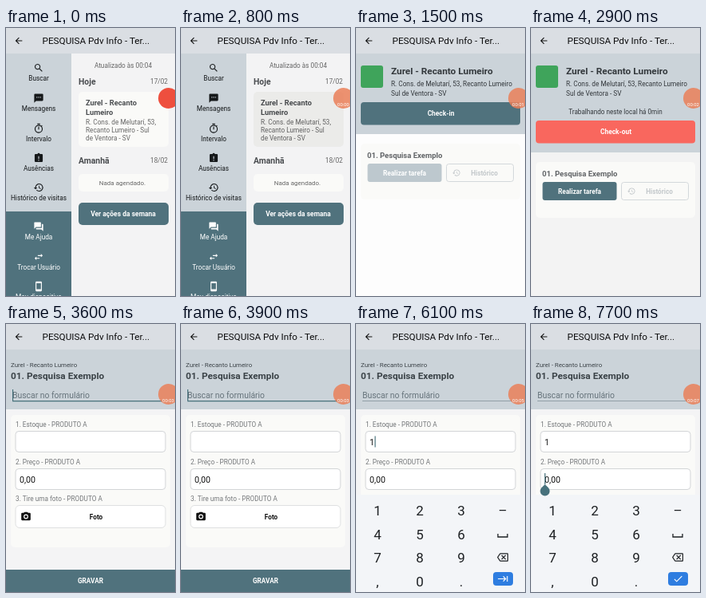
An HTML page for the animation above (8000 ms loop, 212x336 px).

```html
<!DOCTYPE html>
<html lang="pt-BR">
<head>
<meta charset="utf-8">
<title>Pesquisa</title>
<style>
html, body { margin: 0; width: 100%; height: 100%; overflow: hidden; background: #f4f4f5; }
svg { display: block; width: 100%; height: 100%; font-family: Roboto, "Open Sans", sans-serif; }
text { white-space: pre; }
</style>
</head>
<body>
<svg id="stage" viewBox="0 0 212 336"></svg>
<script>
const LOOP = 8000;
const TEAL = '#50727d', BAND = '#cbd3d9', HEAD = '#dadee3', PAGE = '#f4f4f5', CARD = '#fafaf8';
const INK = '#26292c', OFF = '#c3c8cb';
const PLACE = 'Zurel - Recanto Lumeiro';
const STREET = 'R. Cons. de Melutarí, 53,';

// Moments of the session, in ms
const OPEN_VISIT = 940, CHECK_IN = 1900, OPEN_FORM = 3240, SEARCH = 3500;
const STOCK = 4800, KEYS = 4950, TYPED = 5900, PRICE = 7500;

const ICONS = {
  back: 'M20 11H7.8l5.6-5.6L12 4l-8 8 8 8 1.4-1.4L7.8 13H20z',
  search: 'M9.5 3a6.5 6.5 0 1 0 4 11.6l.5.9 5 5 1.5-1.5-5-5-.9-.5A6.5 6.5 0 0 0 9.5 3zM9.5 5a4.5 4.5 0 1 1 0 9 4.5 4.5 0 0 1 0-9z',
  sms: 'M20 2H4a2 2 0 0 0-2 2v18l4-4h14a2 2 0 0 0 2-2V4a2 2 0 0 0-2-2zM9 11H7V9h2zM13 11h-2V9h2zM17 11h-2V9h2z',
  timer: 'M9 1h6v2H9zM11 8h2v6h-2zM19 7.4l1.4-1.4-1.4-1.4L17.6 6A9 9 0 1 0 19 7.4zM12 6a7 7 0 1 1 0 14 7 7 0 0 1 0-14z',
  late: 'M19 3h-4.2a3 3 0 0 0-5.6 0H5a2 2 0 0 0-2 2v14a2 2 0 0 0 2 2h14a2 2 0 0 0 2-2V5a2 2 0 0 0-2-2zM13 18h-2v-2h2zM13 14h-2V8h2z',
  history: 'M13 3a9 9 0 0 0-9 9H1l4 4 4-4H6a7 7 0 1 1 2 5l-1.4 1.4A9 9 0 1 0 13 3zM12 8v5l4.3 2.5.7-1.2-3.5-2.1V8z',
  forum: 'M21 6h-2v9H6v2a1 1 0 0 0 1 1h11l4 4V7a1 1 0 0 0-1-1zM17 12V3a1 1 0 0 0-1-1H3a1 1 0 0 0-1 1v14l4-4h10a1 1 0 0 0 1-1z',
  swap: 'M7 11l-4 4 4 4v-3h7v-2H7zM21 9l-4-4v3h-7v2h7v3z',
  phone: 'M17 1H7a2 2 0 0 0-2 2v18a2 2 0 0 0 2 2h10a2 2 0 0 0 2-2V3a2 2 0 0 0-2-2zM17 18H7V5h10z',
  camera: 'M9 2L7.2 4H4a2 2 0 0 0-2 2v12a2 2 0 0 0 2 2h16a2 2 0 0 0 2-2V6a2 2 0 0 0-2-2h-3.2L15 2zM12 7a5 5 0 1 0 0 10 5 5 0 0 0 0-10zM12 9a3 3 0 1 1 0 6 3 3 0 0 1 0-6z',
  erase: 'M22 3H7L5.4 3.9 0 12l5.4 8.1L7 21h15a2 2 0 0 0 2-2V5a2 2 0 0 0-2-2zM22 19H7l-4.6-7L7 5h15zM10.4 17l3.6-3.6 3.6 3.6 1.4-1.4-3.6-3.6L19 8.4 17.6 7 14 10.6 10.4 7 9 8.4l3.6 3.6L9 15.6z',
  check: 'M9 16.2L4.8 12l-1.4 1.4L9 19 21 7l-1.4-1.4z',
  tab: 'M11.6 7.4L15.2 11H1v2h14.2l-3.6 3.6L13 18l6-6-6-6zM20 6v12h2V6z'
};

const rect = (x, y, w, h, fill, r = 0, more = '') =>
  `<rect x="${x}" y="${y}" width="${w}" height="${h}" rx="${r}" fill="${fill}" ${more}/>`;
// y is the vertical middle of the capitals
const text = (s, x, y, size = 8.24, fill = INK, weight = 400, anchor = 'start') =>
  `<text x="${x}" y="${y + size * .355}" font-size="${size}" fill="${fill}" font-weight="${weight}" text-anchor="${anchor}">${s}</text>`;
const bold = (s, x, y, size, fill) => text(s, x, y, size, fill, 700);
const label = (s, x, y, fill, size = 8.24) => text(s, x, y, size, fill, 700, 'middle');
const icon = (name, x, y, size, fill = '#111') =>
  `<path d="${ICONS[name]}" fill="${fill}" fill-rule="evenodd" transform="translate(${x - size / 2} ${y - size / 2}) scale(${size / 24})"/>`;
const group = (s, y, alpha = 1) => `<g transform="translate(0 ${y})" opacity="${alpha}">${s}</g>`;
const during = (t, from, to, s) => t >= from && t < to ? s : '';
const caret = (t, since, x, y) =>
  (t - since) % 1000 < 500 ? rect(x, y, 1.1, 14, '#3f6a75') : '';
const clamp = v => Math.max(0, Math.min(1, v));

const header = () => rect(0, 0, 212, 32, HEAD) + icon('back', 16, 16, 13) +
  text('PESQUISA Pdv Info - Ter...', 45.5, 16, 11.75, '#0c0c0d');

function home(t) {
  const menu = [
    ['search', 'Buscar', 50], ['sms', 'Mensagens', 88], ['timer', 'Intervalo', 126],
    ['late', 'Ausências', 163], ['history', 'Histórico de visitas', 200],
    ['forum', 'Me Ajuda', 249], ['swap', 'Trocar Usuário', 287], ['phone', 'Meu dispositivo', 324]
  ];
  return rect(0, 0, 212, 336, '#f3f3f4') + header() +
    rect(0, 32, 82, 198, BAND) + rect(0, 230, 82, 106, TEAL) +
    menu.map(([name, s, y]) => {
      const fill = y > 230 ? '#fff' : '#15181a';
      return icon(name, 41, y, 13.5, fill) + text(s, 41, y + 13.5, 8.24, fill, 400, 'middle');
    }).join('') +
    text('Atualizado às 00:04', 147, 47, 8.24, '#666', 400, 'middle') +
    bold('Hoje', 91, 67, 10.4, '#4a4d50') + text('17/02', 203, 67, 8.24, '#666', 400, 'end') +
    rect(91, 80, 113, 69, CARD, 5) +
    bold('Zurel - Recanto', 100, 94, 9.3, '#4a4d50') + bold('Lumeiro', 100, 106, 9.3, '#4a4d50') +
    text(STREET, 100, 118, 8.24, '#666') +
    text('Recanto Lumeiro - Sul', 100, 128, 8.24, '#666') +
    text('de Ventora - SV', 100, 138, 8.24, '#666') +
    during(t, 700, 950, rect(91, 80, 113, 69, '#000', 5, 'opacity=".06"')) +
    bold('Amanhã', 91, 166, 10.4, '#4a4d50') + text('18/02', 203, 166, 8.24, '#666', 400, 'end') +
    rect(91, 183, 113, 22, CARD, 5) + text('Nada agendado.', 146, 194, 8, '#666', 400, 'middle') +
    rect(91, 219, 113, 28, TEAL, 5) + label('Ver ações da semana', 147, 233, '#fff', 8.5);
}

function visit(t) {
  const working = t >= CHECK_IN;
  const drop = working ? 23 : 0;
  const task =
    rect(6, 145, 200, 70, CARD, 5) +
    bold('01. Pesquisa Exemplo', 14, 160, 9.5, '#606366') +
    rect(14.5, 170, 93, 23, working ? TEAL : '#bdc8ce', 3) + label('Realizar tarefa', 61, 182, '#fff') +
    during(t, 3000, 3300, rect(14.5, 170, 93, 23, '#fff', 3, 'opacity=".2"')) +
    rect(113.5, 170.5, 84, 22, CARD, 3, 'stroke="#d3d8db"') +
    icon('history', 126, 181.5, 11, OFF) + label('Histórico', 161, 182, OFF);
  return rect(0, 0, 212, 336, working ? '#f3f3f3' : '#fdfdfd') + header() +
    rect(0, 32, 212, 101 + drop, BAND) +
    rect(6, 47, 28, 28, '#3fa45b', 3) +
    bold(PLACE, 44, 54, 11.8, '#33383c') +
    text(STREET + ' Recanto Lumeiro', 44, 70, 8.24, '#33383c') +
    text('Sul de Ventora - SV', 44, 82, 8.24, '#33383c') +
    (working ? text('Trabalhando neste local há 0min', 106, 105, 8.15, '#33383c', 400, 'middle') : '') +
    rect(6, 93 + drop, 200, 28.5, working ? '#f9675e' : TEAL, 4) +
    label(working ? 'Check-out' : 'Check-in', 106.5, 107 + drop, '#fff', 8.4) +
    during(t, 1600, CHECK_IN, rect(6, 93, 200, 28.5, '#fff', 4, 'opacity=".15"')) +
    group(task, drop);
}

function form(t) {
  const searching = t < STOCK;
  const field = y => rect(12, y, 188, 26, '#fff', 4, 'stroke="#d3d5d7"');
  const stockCaret = t < TYPED ? caret(t, STOCK, 17, 140.5) : caret(t, TYPED, 23.5, 140.5);
  return rect(0, 0, 212, 336, PAGE) + header() + rect(0, 32, 212, 75, BAND) +
    text(PLACE, 6, 51, 7.9, '#3c4348') +
    bold('01. Pesquisa Exemplo', 6, 65, 11.8, '#3a4247') +
    text('Buscar no formulário', 8, 89.5, 10.4, '#66737b') +
    rect(8, 96, 190, searching ? 1.3 : .8, searching ? '#4b737d' : '#84939b') +
    during(t, SEARCH, STOCK, caret(t, SEARCH, 8, 82)) +
    rect(6, 114, 200, 166, CARD, 5) +
    text('1. Estoque - PRODUTO A', 12, 126, 8.24, '#74777a') + field(134.5) +
    (t >= TYPED ? text('1', 17, 148, 10.6, '#111') : '') +
    during(t, STOCK, PRICE, stockCaret) +
    text('2. Preço - PRODUTO A', 12, 173, 8.24, '#74777a') + field(181.5) +
    text('0,00', 17, 195, 10.6, '#111') +
    during(t, PRICE, LOOP, caret(t, PRICE, 17, 187)) +
    text('3. Tire uma foto - PRODUTO A', 12, 219, 8.24, '#74777a') +
    rect(12, 227.5, 188, 28, '#fff', 5, 'stroke="#dfe0e1"') +
    icon('camera', 25, 241.5, 14) + label('Foto', 113, 242, '#111') +
    rect(0, 308, 212, 28, TEAL) + label('GRAVAR', 106, 322, '#fff');
}

function keyboard(t) {
  const cols = [27, 80, 132, 184], rows = [234, 264, 293, 323];
  const keys = ['123–', '456', '789', ',0.'];
  const digits = keys.map((row, r) => [...row].map((k, c) =>
    text(k, cols[c], rows[r], 17, '#1d2023', 400, 'middle')).join('')).join('');
  return rect(0, 214, 212, 122, '#f3f5f8') +
    during(t, 5800, 6000, rect(4, 220, 46, 28, '#dde1e6', 4)) + digits +
    '<path d="M178 263v4h12v-4" fill="none" stroke="#1d2023" stroke-width="1.3"/>' +
    icon('erase', 184, 292.5, 14, '#1d2023') +
    rect(172, 311, 25, 17, '#2e7de0', 4) +
    icon(t >= PRICE ? 'check' : 'tab', 184.5, 319.5, 14, '#fff');
}

// A new screen fades in while settling upwards beneath a blue status strip
function enter(t, start, screen) {
  if (t < start) return '';
  const rise = 27 * (1 - clamp((t - start) / 350)) ** 5;
  const alpha = 1 - (1 - clamp((t - start) / 200)) ** 5;
  const strip = rise > .2 ? rect(0, -30, 212, 30, '#3f51b5') : '';
  return group(strip + screen(t), rise, alpha);
}

function recorder(t) {
  const active = t >= 500, secs = Math.floor((t - 500) / 1000);
  return `<circle cx="204" cy="88" r="13" fill="${active ? '#ea7f58' : '#ee4f3e'}" opacity="${active ? .85 : 1}"/>` +
    (active ? text('00:0' + secs, 203.5, 96, 6, '#fff', 400, 'middle') : '');
}

function render(t) {
  let s = t < OPEN_VISIT + 350 ? home(t) : '';
  if (t < OPEN_FORM + 350) s += enter(t, OPEN_VISIT, visit);
  s += enter(t, OPEN_FORM, form);
  if (t >= KEYS) s += group(keyboard(t), 122 * (1 - clamp((t - KEYS) / 300)) ** 3);
  if (t >= PRICE) s += '<path d="M17.5 201l4.3 4.3a6 6 0 1 1-8.6 0z" fill="#47717c"/>';
  return s + recorder(t);
}

const stage = document.getElementById('stage');
const began = performance.now();
let shown = -1;
function tick() {
  const t = Math.floor((performance.now() - began) % LOOP / 100) * 100;
  if (t !== shown) stage.innerHTML = render(shown = t);
  requestAnimationFrame(tick);
}
tick();
</script>
</body>
</html>
```
